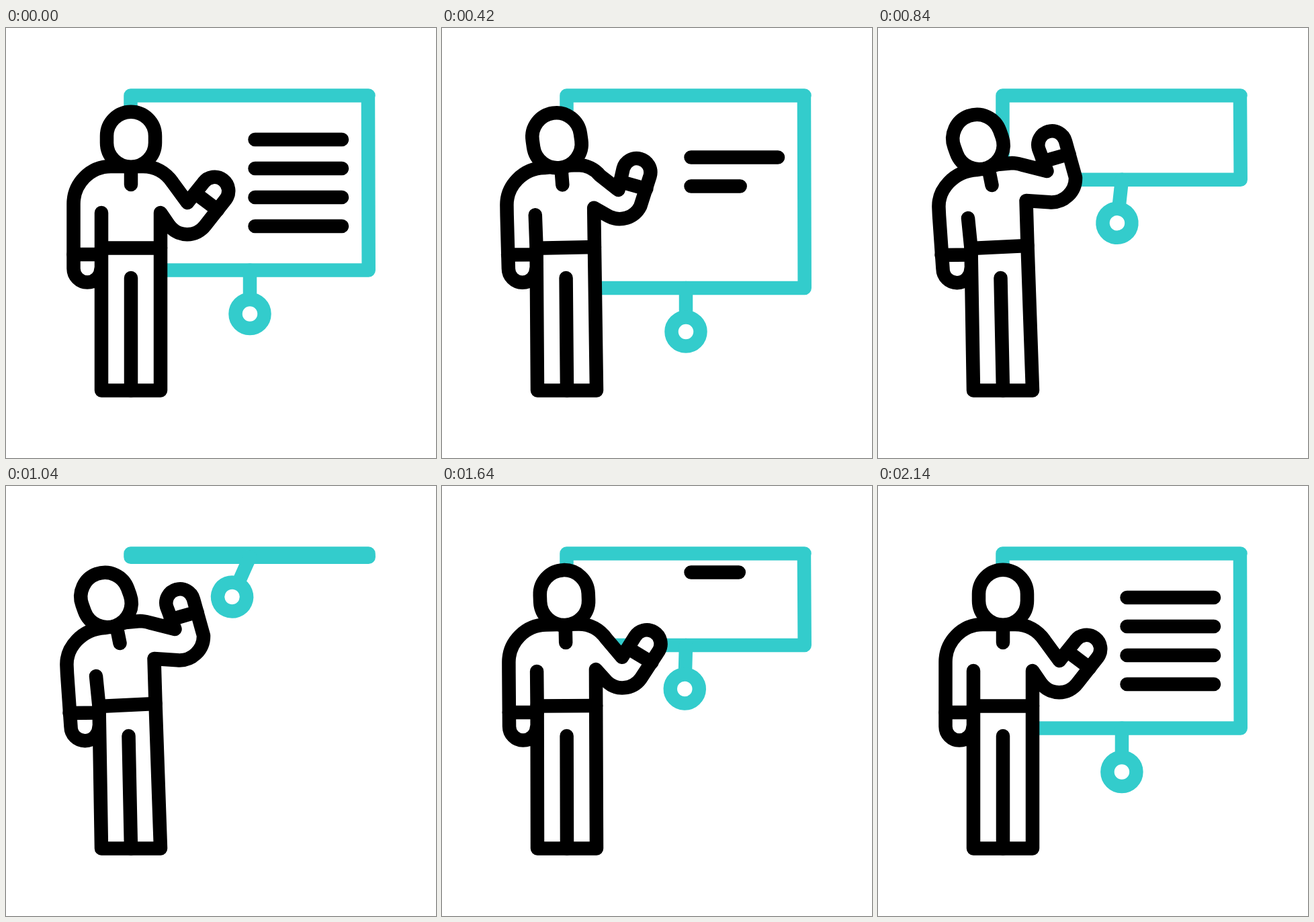
These frames come from a looping animation (640 by 640 pixels, 2.4 s). An HTML page:

```html
<!DOCTYPE html>
<html lang="en">
<head>
<meta charset="utf-8">
<title>Presenter</title>
<style>
  html, body { margin: 0; width: 100%; height: 100%; overflow: hidden; background: #fff; }
  svg { display: block; width: 100vw; height: 100vh; }
  path, circle { fill: none; stroke-width: 20.5; stroke-linecap: round; stroke-linejoin: round; }
  .teal { stroke: #33cccc; }
  .ink { stroke: #000; }
  .solid { fill: #fff; }
</style>
</head>
<body>
<svg viewBox="0 0 640 640">
  <clipPath id="sheet"><rect x="180" y="100" width="360" height="540"/></clipPath>
  <path id="lines" class="ink" clip-path="url(#sheet)"/>
  <path id="screen" class="teal"/>
  <g id="pull" class="teal">
    <path d="M0 0V43"/>
    <circle cy="65" r="21.5" class="solid"/>
  </g>
  <path id="body" class="ink solid"/>
  <path id="details" class="ink"/>
  <path id="head" class="ink solid" d="M-36 -5A36 36 0 0 1 36 -5V5A36 36 0 0 1 -36 5Z"/>
</svg>
<script>
const LOOP = 2400;
const el = id => document.getElementById(id);
const clamp = x => Math.max(0, Math.min(1, x));
const mix = (a, b, k) => a + (b - a) * k;
const ease = x => (x = clamp(x), x * x * (3 - 2 * x));

// Eased travel through [time, value] keys.
function eased(keys, t) {
  let value = keys[0][1];
  for (let i = 1; i < keys.length; i++) {
    const [t0, v0] = keys[i - 1], [t1, v1] = keys[i];
    if (t >= t0) value = mix(v0, v1, ease((t - t0) / (t1 - t0)));
  }
  return value;
}

// Smooth curve through [time, value] keys, flat at both ends.
function spline(keys, t) {
  const last = keys.length - 1;
  if (t <= keys[0][0]) return keys[0][1];
  if (t >= keys[last][0]) return keys[last][1];
  const slope = i => i === 0 || i === last ? 0
    : (keys[i + 1][1] - keys[i - 1][1]) / (keys[i + 1][0] - keys[i - 1][0]);
  const i = keys.findIndex(k => k[0] > t) - 1;
  const [t0, v0] = keys[i], [t1, v1] = keys[i + 1];
  const d = t1 - t0, x = (t - t0) / d;
  return mix(v0, v1, ease(x))
    + d * x * (1 - x) * ((1 - x) * slope(i) - x * slope(i + 1));
}

const leanOut = [[130, 0], [420, .405], [540, .74], [680, .955], [810, 1]];
const leanBack = [[1090, 1], [1340, .72], [1640, .11], [1800, 0]];
const barKeys = [[100, 360.5], [500, 390], [550, 390], [1082, 100.5], [1223, 100.5], [2030, 360.5]];

function swing(t) {
  if (t < 1040) return 24 * ease((t - 740) / 300);
  const s = t - 1040;
  return 24 * Math.exp(-s * .0046) * Math.cos(s * Math.PI / 300);
}

function drawScreen(t) {
  const bar = eased(barKeys, t);
  el('screen').setAttribute('d',
    `M539.5 100.5H185.5V${bar}H539.7L${bar > 130 ? 538.9 : 539.5} 100.5`);
  el('pull').setAttribute('transform', `translate(363 ${bar}) rotate(${swing(t)})`);

  const shown = t < 1100 ? 4 - t / 172.5 : (t - 1200) / 172.5;
  let d = '';
  for (let i = 0; i < 4; i++) {
    const part = clamp(shown - i);
    if (part > 0) d += `M370.5 ${bar - 194.5 + i * 43}h${129.5 * part}`;
  }
  el('lines').setAttribute('d', d);
}

function drawPerson(lean) {
  // Upright position, then leaning position.
  const p = (x0, y0, x1, y1) => [mix(x0, x1, lean), mix(y0, y1, lean)];
  const hipL = p(142, 327.5, 138.5, 328), hipR = p(230, 327.5, 222.5, 324);

  const [fx, fy] = p(310.5, 242.5, 259, 174);
  const angle = mix(37, -16, lean) * Math.PI / 180;
  const sin = Math.sin(angle), cos = Math.cos(angle);
  const onFist = (side, down) =>
    [fx + side * 20.7 * cos - down * sin, fy + side * 20.7 * sin + down * cos];

  el('body').setAttribute('d', [
    'M', p(141.5, 358, 138.5, 358),
    'A20.5 20.5 0 0 1', p(100.5, 358, 96.5, 358.5),
    'L', p(100.5, 278, 91, 279),
    'L', p(100.5, 262, 90.5, 268),
    'C', p(100.5, 231, 89, 240), p(125.5, 206, 113, 213), p(156, 206, 147, 211),
    'L', p(186, 206, 178, 203),
    'L', p(204, 206, 200, 201),
    'C', p(222, 206, 206, 201), p(238, 215, 212, 203), p(248, 230, 216, 204),
    'L', p(270, 260, 251.5, 213),
    'L', onFist(-1, 0),
    'A20.7 20.7 0 0 1', onFist(1, 0),
    'L', p(296, 294.5, 294, 222.5),
    `A${p(33.5, 33.5, 36, 36)} 0 0 1`, p(243, 294, 255, 259.3),
    'L', p(230, 275, 220.5, 257),
    'L', hipR, 'L230 539.5H142L', hipL,
    'L', p(142, 275, 134, 283)
  ].join(' '));

  el('details').setAttribute('d', [
    'M', hipL, 'L', hipR,
    'M', p(100.5, 337, 94.5, 338), 'L', p(142, 337, 138.3, 337.5),
    'M', p(186, 372, 182.5, 372), 'L186 539.5',
    'M', p(186, 206, 164.5, 209), 'L', p(186, 233, 169.5, 234),
    'M', onFist(-1, 20), 'L', onFist(1, 20)
  ].join(' '));

  el('head').setAttribute('transform',
    `translate(${p(186, 165.7, 149, 169.5)}) rotate(${-20 * lean})`);
}

function draw(t) {
  drawScreen(t);
  drawPerson(t < 1000 ? spline(leanOut, t) : spline(leanBack, t));
}

let start;
function tick(now) {
  start ??= now;
  draw((now - start) % LOOP);
  requestAnimationFrame(tick);
}
draw(0);
requestAnimationFrame(tick);
</script>
</body>
</html>
```
